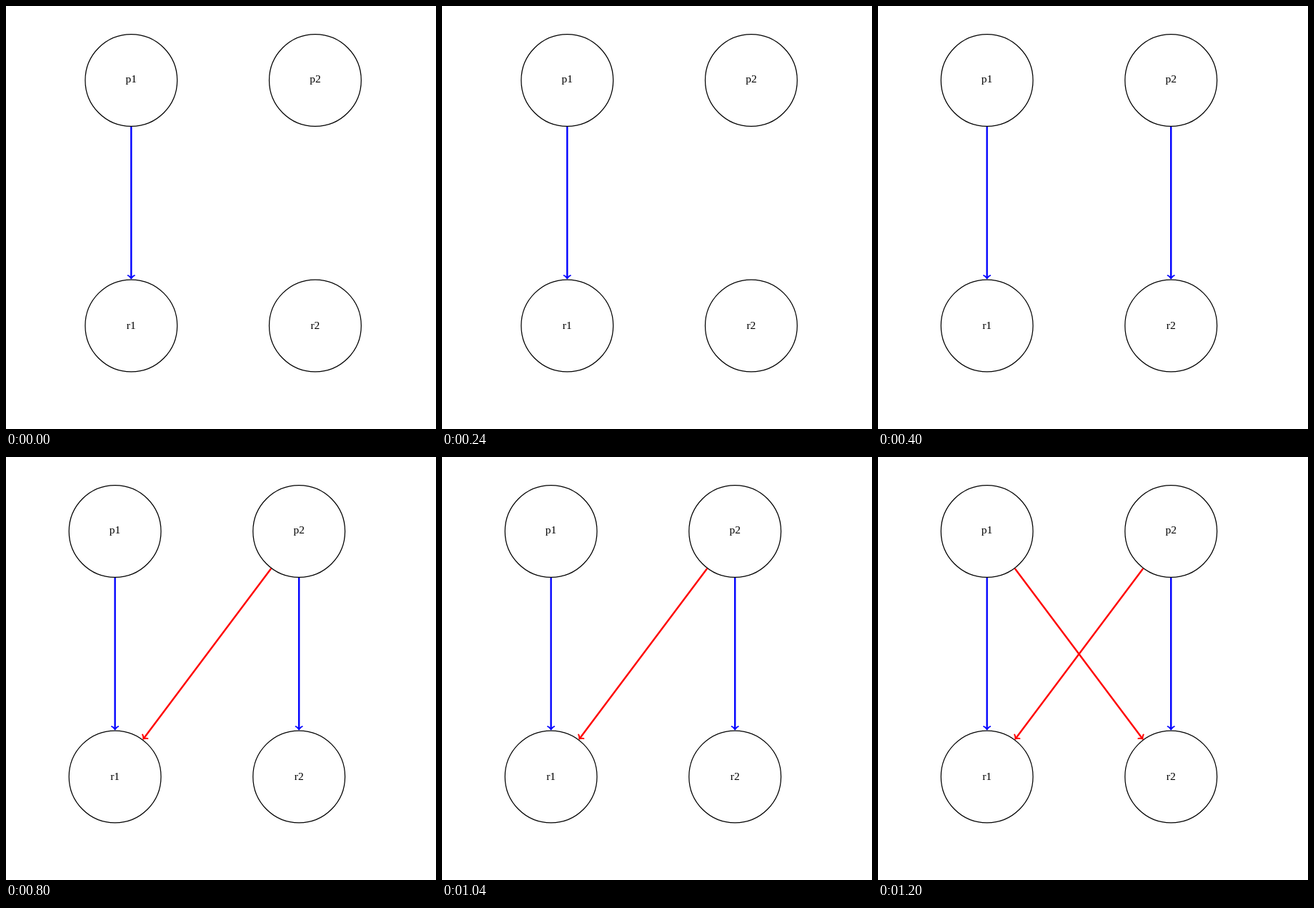
Write an HTML page that moves like this. It is 602 px wide and 592 px high and loops after 1600 ms.

```html
<!DOCTYPE html>
<html lang="en">
<head>
<meta charset="utf-8">
<title>Resource graph</title>
<style>
  html, body { margin: 0; width: 100%; height: 100%; overflow: hidden; background: #fff; }
  svg { display: block; width: 602px; height: 592px; }
  circle { fill: none; stroke: #000; stroke-width: 1.25; }
  text { font: 15.5px "Liberation Serif", "Noto Serif", serif; text-anchor: middle; fill: #000; }
  .edge { fill: none; stroke-width: 2.4; }
  .held { stroke: #00f; marker-end: url(#held-tip); }
  .wanted { stroke: #f00; marker-end: url(#wanted-tip); }
  .tip { fill: none; stroke-width: 1.93; stroke-linecap: round; stroke-linejoin: round; }

  .graph, .second, .third, .fourth { animation: 1.6s step-end infinite; }
  .graph { animation-name: settle; }
  .second { animation-name: second; }
  .third { animation-name: third; }
  .fourth { animation-name: fourth; }
  @keyframes settle { 0% { transform: translateX(22.7px); } 25%, 100% { transform: none; } }
  @keyframes second { 0% { visibility: hidden; } 25%, 100% { visibility: visible; } }
  @keyframes third { 0% { visibility: hidden; } 50%, 100% { visibility: visible; } }
  @keyframes fourth { 0% { visibility: hidden; } 75%, 100% { visibility: visible; } }
</style>
</head>
<body>
<svg viewBox="0 0 602 592">
  <defs>
    <path id="barb" class="tip" d="M-3.44 4.58C-3.15 2.87 0 .29 .86 0C0 -.29 -3.15 -2.87 -3.44 -4.58"/>
    <marker id="held-tip" markerUnits="userSpaceOnUse" markerWidth="16" markerHeight="16" viewBox="-8 -8 16 16" orient="auto">
      <use href="#barb" stroke="#00f"/>
    </marker>
    <marker id="wanted-tip" markerUnits="userSpaceOnUse" markerWidth="16" markerHeight="16" viewBox="-8 -8 16 16" orient="auto">
      <use href="#barb" stroke="#f00"/>
    </marker>
  </defs>
  <g class="graph">
    <circle cx="152.6" cy="104" r="64.4"/>
    <circle cx="410.2" cy="104" r="64.4"/>
    <circle cx="152.6" cy="447.4" r="64.4"/>
    <circle cx="410.2" cy="447.4" r="64.4"/>
    <text x="152.6" y="107.4">p1</text>
    <text x="410.2" y="107.4">p2</text>
    <text x="152.6" y="452.2">r1</text>
    <text x="410.2" y="452.2">r2</text>
    <path class="edge held" d="M152.6 169V380.6"/>
    <path class="edge held second" d="M410.2 169V380.6"/>
    <path class="edge wanted third" d="M371.2 156L192.7 394"/>
    <path class="edge wanted fourth" d="M191.6 156L370.1 394"/>
  </g>
</svg>
</body>
</html>
```
